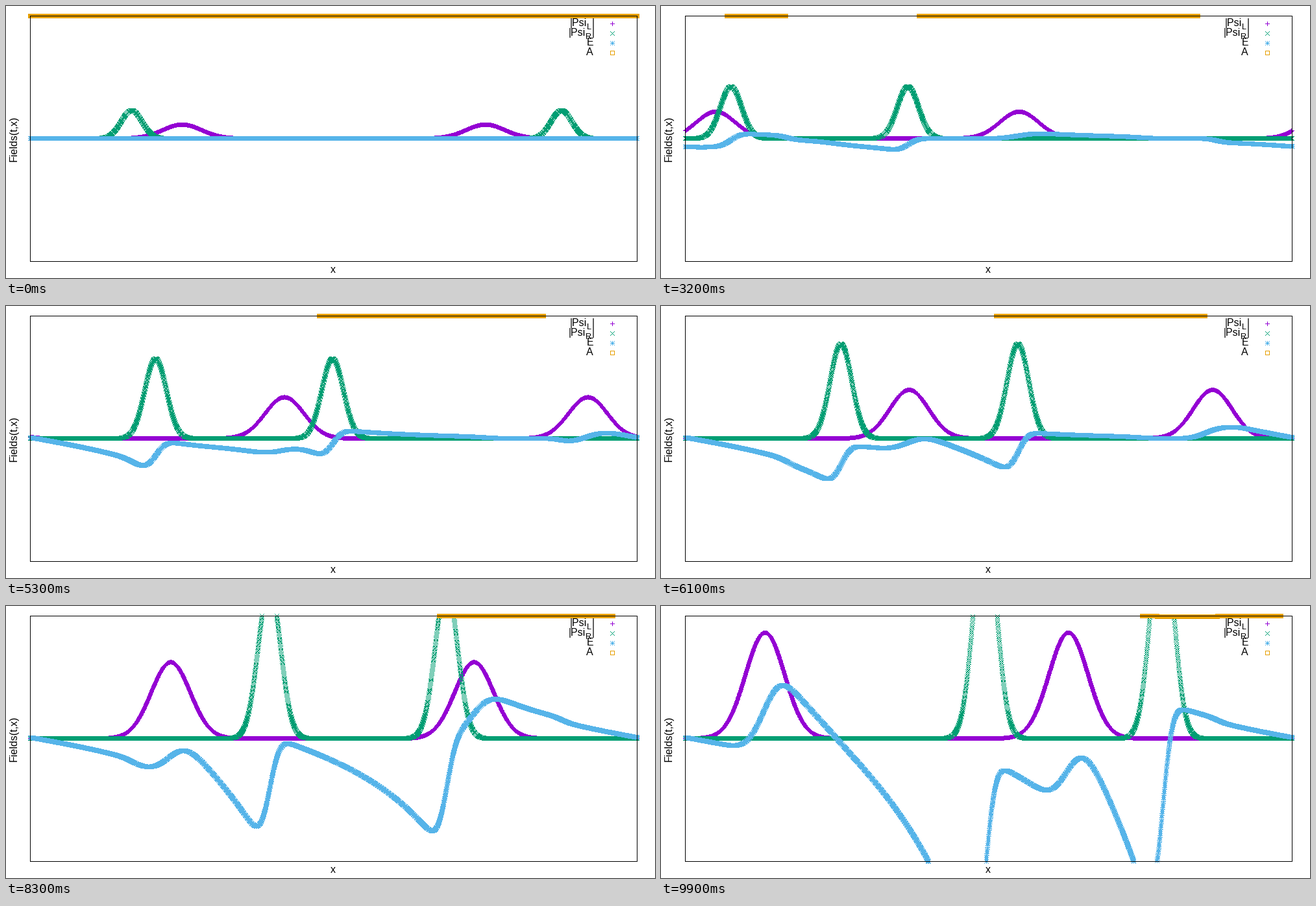
Recreate the animation shown at these times as a matplotlib script. Size 1000 px wide and 420 px high, loop 10 s.

```python
import numpy as np
import matplotlib.pyplot as plt
from matplotlib.animation import FuncAnimation
from matplotlib.patches import Rectangle
from matplotlib.path import Path

W, H, DPI = 1000, 420, 100
PX = 72 / DPI                       # one pixel in points
LEFT, TOP, RIGHT, BOTTOM, ZERO = 37, 15, 972, 394, 204
SPAN = RIGHT - LEFT
FRAMES, SUBSTEPS, CELLS = 100, 8, 3200
SPEED = SPAN / 160                  # pixels per frame
GAIN_LEFT, GAIN_RIGHT = 6.45e-4, 6.3e-4

PURPLE, GREEN, BLUE, ORANGE = "#9400d3", "#009e73", "#56b4e9", "#e69f00"

u = np.linspace(0, SPAN, CELLS + 1)


def packet(center, width):
    """Gaussian bump on the periodic interval."""
    d = (u - center + SPAN / 2) % SPAN - SPAN / 2
    return np.exp(-d**2 / (2 * width**2))


def psi_left(t):
    amp = 21.5 * np.exp(0.0205 * t)
    return amp * sum(packet(f * SPAN - SPEED * t, 30) for f in (1 / 4, 3 / 4))


def psi_right(t):
    amp = 43.3 * np.exp(0.0185 * t + 2.35e-5 * t**2)
    width = 16 + 0.012 * t
    return amp * sum(packet(f * SPAN + SPEED * t, width) for f in (1 / 6, 7 / 8))


def integrate():
    """E is driven by the difference of densities, A by E."""
    e, a = np.zeros_like(u), np.zeros_like(u)
    dt = 1 / SUBSTEPS
    states = []
    for n in range(FRAMES):
        states.append((e.copy(), a.copy()))
        for k in range(SUBSTEPS):
            t = n + (k + 0.5) * dt
            step = dt * (GAIN_LEFT * psi_left(t)**2
                         - GAIN_RIGHT * psi_right(t)**2)
            a += (e + step / 2) * dt
            e += step
    return states


STATES = integrate()


def pixel_marker(test, r=3):
    """Crisp marker: unit squares at the pixel offsets that pass the test."""
    reach = range(-r, r + 1)
    squares = [Path([(i, -j), (i + 1, -j), (i + 1, -j - 1), (i, -j - 1), (i, -j)],
                    closed=True)
               for i in reach for j in reach if test(i, j)]
    return Path.make_compound_path(*squares)


PLUS = pixel_marker(lambda i, j: i == 0 or j == 0)
CROSS = pixel_marker(lambda i, j: abs(i) == abs(j))
STAR = pixel_marker(lambda i, j: i == 0 or j == 0 or abs(i) == abs(j))
SQUARE = pixel_marker(lambda i, j: max(abs(i), abs(j)) == 3)

fig = plt.figure(figsize=(W / DPI, H / DPI), dpi=DPI, facecolor="white")
ax = fig.add_axes([0, 0, 1, 1])
ax.set_xlim(0, W)
ax.set_ylim(H, 0)
ax.axis("off")


def dots(x, y, marker, color, z):
    # the marker path reaches 4 units from its origin
    line, = ax.plot(x, y, ls="none", marker=marker, ms=8 * PX, mew=0,
                    mec="none", mfc=color, zorder=z, clip_on=False)
    return line


def label(x, y, text, size=16, **kw):
    ax.text(x, y, text, family="Liberation Sans", size=size * PX,
            color="black", va="baseline", zorder=20, **kw)


x = LEFT + u + 0.2
curves = []
for i, (marker, color) in enumerate([(PLUS, PURPLE), (CROSS, GREEN),
                                     (STAR, BLUE), (SQUARE, ORANGE)]):
    curves.append(dots(x, np.full_like(x, np.nan), marker, color, 2 + i))
    dots([934.2], [27.2 + 15 * i], marker, color, 12)

ax.add_patch(Rectangle((LEFT + 0.2, TOP + 0.2), SPAN, BOTTOM - TOP, fill=False,
                       ec="black", lw=PX, antialiased=False, zorder=15))

for y, x0, sub in [(31, 869, "L"), (46, 867, "R")]:
    label(x0, y, "|Psi")
    label(x0 + 25.6, y + 5, sub, size=12.8)
    label(902.4, y, "|")
label(894.5, 61, "E")
label(894, 76, "A")

label(500, 412, "x")
label(17, 204.5, "Fields(t,x)", rotation=90, rotation_mode="anchor",
      ha="center")


def inside(height):
    """Screen rows of the points that lie within the box."""
    y = ZERO - height
    return np.where((y >= TOP) & (y <= BOTTOM), y + 0.2, np.nan)


def draw(n):
    e, a = STATES[n]
    # A starts on the upper limit and leaves the range where it grows
    floor = -1 - 2.3e-7 * n**4
    row = TOP + 0.2 + np.round(np.maximum(a, 0) / 1800)
    rows = [inside(psi_left(n)), inside(psi_right(n)), inside(e),
            np.where(a >= floor, row, np.nan)]
    for curve, y in zip(curves, rows):
        curve.set_ydata(y)
    return curves


anim = FuncAnimation(fig, draw, frames=FRAMES, interval=100, repeat=True,
                     repeat_delay=0, blit=False)
plt.show()
```
